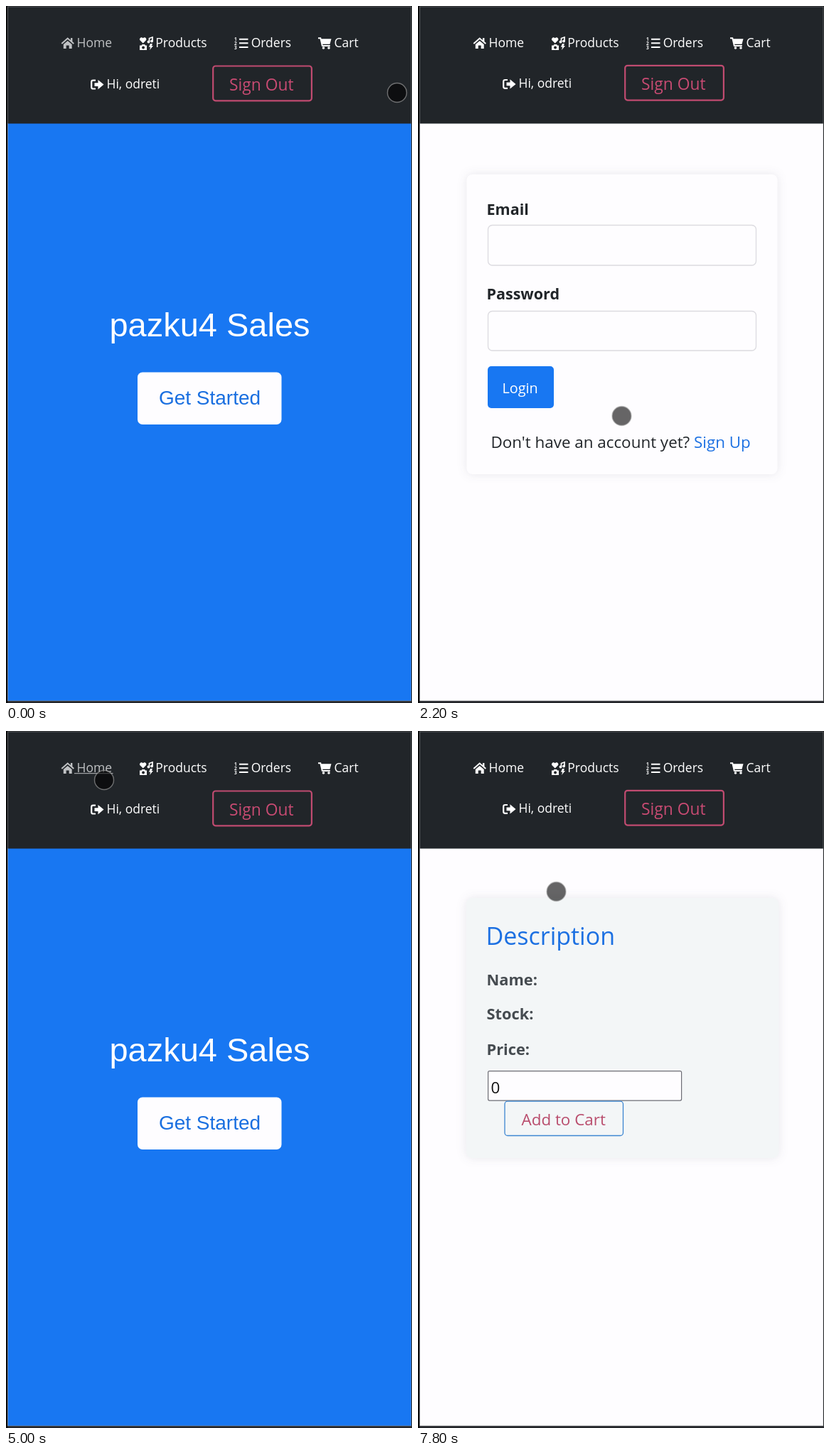
Recreate the animation shown at these times as an HTML page. Size 571 by 981 pixels, loop 8 s.

```html
<!DOCTYPE html>
<html lang="en">
<head>
<meta charset="utf-8">
<title>Shop demo</title>
<style>
  html, body { margin: 0; width: 100%; height: 100%; overflow: hidden; background: #08090a; }
  svg { display: block; width: 100%; height: 100%; font: 22.4px "Open Sans", "Noto Sans", sans-serif; }
  .page { display: none; }
  .page.shown { display: inline; }
  .arial { font-family: "Liberation Sans", Arial, sans-serif; text-anchor: middle; }
  .label { font-weight: 700; font-size: 21.5px; }
  .muted { fill: #454b50; font-size: 21.8px; }
  .value { font-weight: 500; }
  .blue { fill: #1c70e2; }
  .card { fill: #fefdff; filter: drop-shadow(0 0 7px rgba(40, 40, 70, .1)); }
  .item { fill: #fefdff; filter: drop-shadow(0 3px 4px rgba(40, 40, 60, .13)); }
  .field { fill: #fefdff; stroke: #dcdbe0; stroke-width: 1.3; }
  .link { fill: #fff; color: #fff; font-size: 17.5px; }
  .link.active, .link.hover { fill: #bfc1c3; color: #bfc1c3; }
  .line { fill: none; stroke: currentColor; }
  .under { stroke: currentColor; visibility: hidden; }
  .hover .under { visibility: inherit; }
  .start { fill: #fefdff; }
  .hover .start { fill: #e8edf4; }
  .item-link { color: #1c70e2; }
</style>
</head>
<body>
<svg viewBox="0 0 571 981" preserveAspectRatio="none">
  <rect width="571" height="981" fill="#08090a"/>
  <rect x="2.5" y="165" width="567.5" height="813" fill="#fefdff"/>

  <g class="page" id="home">
    <rect x="2.5" y="165" width="567.5" height="813" fill="#1877f2"/>
    <text class="arial" x="286.5" y="464.5" font-size="47" fill="#fff">pazku4 Sales</text>
    <g data-box="185 516 388 589">
      <rect class="start" x="185" y="515.5" width="202.5" height="73.5" rx="7"/>
      <text class="arial" x="286.5" y="560.5" font-size="28" fill="#1a6fe0">Get Started</text>
    </g>
  </g>

  <g class="page" id="login" fill="#212529">
    <rect class="card" x="68.5" y="237" width="437" height="422" rx="8"/>
    <text class="label" x="96.5" y="293.5">Email</text>
    <rect class="field" x="98.5" y="308.5" width="377" height="56.5" rx="6"/>
    <text class="label" x="96.5" y="413">Password</text>
    <rect class="field" x="98.5" y="429.5" width="377" height="55.5" rx="6"/>
    <rect x="98" y="507" width="93" height="59" rx="5" fill="#1877f2"/>
    <text x="118.5" y="544.5" font-size="19.8" fill="#fff">Login</text>
    <text x="102.5" y="622">Don't have an account yet?</text>
    <text class="blue" x="388" y="622">Sign Up</text>
  </g>

  <g class="page" id="products"></g>

  <g class="page" id="detail">
    <rect class="card" x="67.5" y="235" width="440" height="366" rx="9" style="fill:#f3f6f7"/>
    <text class="blue value" x="95.5" y="301" font-size="34">Description</text>
    <text class="label muted" x="96.5" y="357.5">Name:</text>
    <text class="label muted" x="96.5" y="406">Stock:</text>
    <text class="label muted" x="96.5" y="456">Price:</text>
    <rect x="98.6" y="478.6" width="272" height="41.5" rx="2" fill="#fefdff" stroke="#6d6d75" stroke-width="1.2"/>
    <text x="102.5" y="510" fill="#111">0</text>
    <rect x="122" y="521.2" width="166.5" height="48.3" rx="4" fill="none" stroke="#3d86d2" stroke-width="1.3"/>
    <text x="145.5" y="554.5" fill="#b94d6d">Add to Cart</text>
  </g>

  <rect x="2.5" y="1" width="567.5" height="164.5" fill="#212529"/>

  <g class="link" data-page="home" data-box="77 30 151 76">
    <path class="line" d="M78.3 53 86.7 45.6 95.3 53" stroke-width="2"/>
    <path d="M91 45h2.4v5H91zM80.8 54l5.9-5.1 6 5.1v6h-4v-4.4h-4V60h-3.9z"/>
    <text x="99.5" y="57.5">Home</text>
    <path class="under" d="M96 59.7H150.5"/>
  </g>
  <g class="link" data-page="products" data-box="187 30 285 76">
    <path d="M192.7 52.5l-4.2-4.2c-1.8-2.5 1.8-6 4.2-3 2.400-3 6 .5 4.200 3z"/>
    <path class="line" d="M201.500 50.500V45.500l4.500-1.500V49.500" stroke-width="1.700"/>
    <circle cx="200.500" cy="50.500" r="1.900"/><circle cx="205" cy="49.500" r="1.900"/>
    <path fill-rule="evenodd" d="M188 55.500h2.500l1-1.500h3.500l1 1.500h2V62H188zM193 56.500a2 2 0 1 0 .1 0zM203 53h3l-1.200 3h2.200l-5 6 1.200-4.300H201z"/>
    <text x="210.300" y="57.500">Products</text>
    <path class="under" d="M207 59.700H284"/>
  </g>
  <g class="link" data-box="320 30 402 76">
    <path class="line" d="M328 46.700h12.500M328 52.300h12.500M328 58h12.500" stroke-width="2"/>
    <g font-size="6.500" font-weight="700">
      <text x="321" y="48.700">1</text><text x="321" y="54.700">2</text><text x="321" y="60.700">3</text>
    </g>
    <text x="344.700" y="57.500">Orders</text>
    <path class="under" d="M341 59.700H401"/>
  </g>
  <g class="link" data-box="438 30 497 76">
    <path class="line" d="M439 45.300h3.300l2.500 10.700h11" stroke-width="1.900"/>
    <path d="M443 46.300h14.500l-2 7.500h-11z"/>
    <circle cx="446.500" cy="59" r="1.800"/><circle cx="454" cy="59" r="1.800"/>
    <text x="461.500" y="57.500">Cart</text>
    <path class="under" d="M458 59.700H496.500"/>
  </g>
  <g id="account">
    <g class="link" data-box="118 92 220 126">
      <path class="line" d="M126 104.700h-3.500q-2.300 0-2.300 2.300v7.200q0 2.300 2.300 2.300h3.500" stroke-width="2.200"/>
      <path d="M124.500 108.300h5v-4.300l8 6.600-8 6.600v-4.300h-5z"/>
      <text x="141.500" y="116">Hi, odreti</text>
      <path class="under" d="M138 118.200H219"/>
    </g>
    <rect x="291.200" y="84.500" width="138.700" height="48.800" rx="3.500" fill="none" stroke="#c04b70" stroke-width="2.200"/>
    <text x="314" y="118.800" font-size="22.800" fill="#c94b73">Sign Out</text>
  </g>

  <rect x="2.500" y="978" width="568.500" height="3" fill="#25272b"/>
  <rect x="2.500" y="1" width="567.500" height="977" fill="none" stroke="#8a8c90" stroke-opacity=".6"/>
  <circle id="cursor" r="13.500" fill="#000" fill-opacity=".6" stroke="#aaa" stroke-opacity=".6" stroke-width="1.400"/>
</svg>
<script>
const LOOP = 8000;
const $ = id => document.getElementById(id);

const items = [
  ["Steel Bowl", "62.77 $"], ["Cotton Shirt", "336.03 $"], ["Steel Watch", "293.07 $"],
  ["Cotton Bowl", "129.94 $"], ["Glass Shirt", ""]
];
$("products").innerHTML = items.map(([name, price], i) => `
  <g transform="translate(0 ${i * 186})">
    <rect class="item" x="3" y="165" width="567" height="157.500" rx="9"/>
    <text class="label muted" x="30.500" y="221.500">Product:</text>
    <g class="item-link" ${i ? "" : 'data-box="138 200 248 230"'}>
      <text class="blue value" x="138" y="221.500">${name}</text>
      <path class="under" d="M138.500 224.500h109"/>
    </g>
    ${price && `<text class="label muted" x="30.500" y="270.500">Price:</text>
    <text class="blue value" x="105" y="270.500">${price}</text>`}
  </g>`).join("");

// [start ms, page]
const scenes = [[0, "home"], [1900, "login"], [5000, "home"], [6500, "products"], [7700, "detail"]];

// [ms, x, y]
const path = [
  [0, 550, 122], [900, 549, 801], [1000, 550, 836], [1400, 334.500, 639], [1800, 286.500, 577],
  [2900, 286.500, 577], [3700, 279, 153], [3800, 279, 138], [3900, 245, 122], [4000, 245, 122],
  [4800, 138, 69], [5600, 138, 69], [6200, 251, 68.500], [6700, 251, 68.500], [7500, 194.500, 226], [LOOP, 194.500, 226]
];

function cursorAt(t) {
  const i = path.findIndex(point => point[0] > t);
  const [t0, x0, y0] = path[i - 1], [t1, x1, y1] = path[i];
  const k = (t - t0) / (t1 - t0);
  return [x0 + (x1 - x0) * k, y0 + (y1 - y0) * k];
}

const pages = document.querySelectorAll(".page");
const links = document.querySelectorAll("[data-page]");
const targets = [...document.querySelectorAll("[data-box]")].map(el => [el, el.dataset.box.split(" ").map(Number)]);

function draw(now) {
  const t = Math.floor(now % LOOP / 100) * 100;
  const page = scenes.filter(([start]) => start <= t).pop()[1];
  const [x, y] = cursorAt(t);
  pages.forEach(el => el.classList.toggle("shown", el.id === page));
  links.forEach(el => el.classList.toggle("active", el.dataset.page === page));
  targets.forEach(([el, [left, top, right, bottom]]) =>
    el.classList.toggle("hover", x > left && x < right && y > top && y < bottom));
  const raised = page === "login" || page === "detail";
  $("account").setAttribute("transform", `translate(0 ${raised ? -0.7 : 0})`);
  $("cursor").setAttribute("transform", `translate(${x} ${y})`);
}

let begin;
function tick(now) {
  begin ??= now;
  draw(now - begin);
  requestAnimationFrame(tick);
}
draw(0);
requestAnimationFrame(tick);
</script>
</body>
</html>
```
